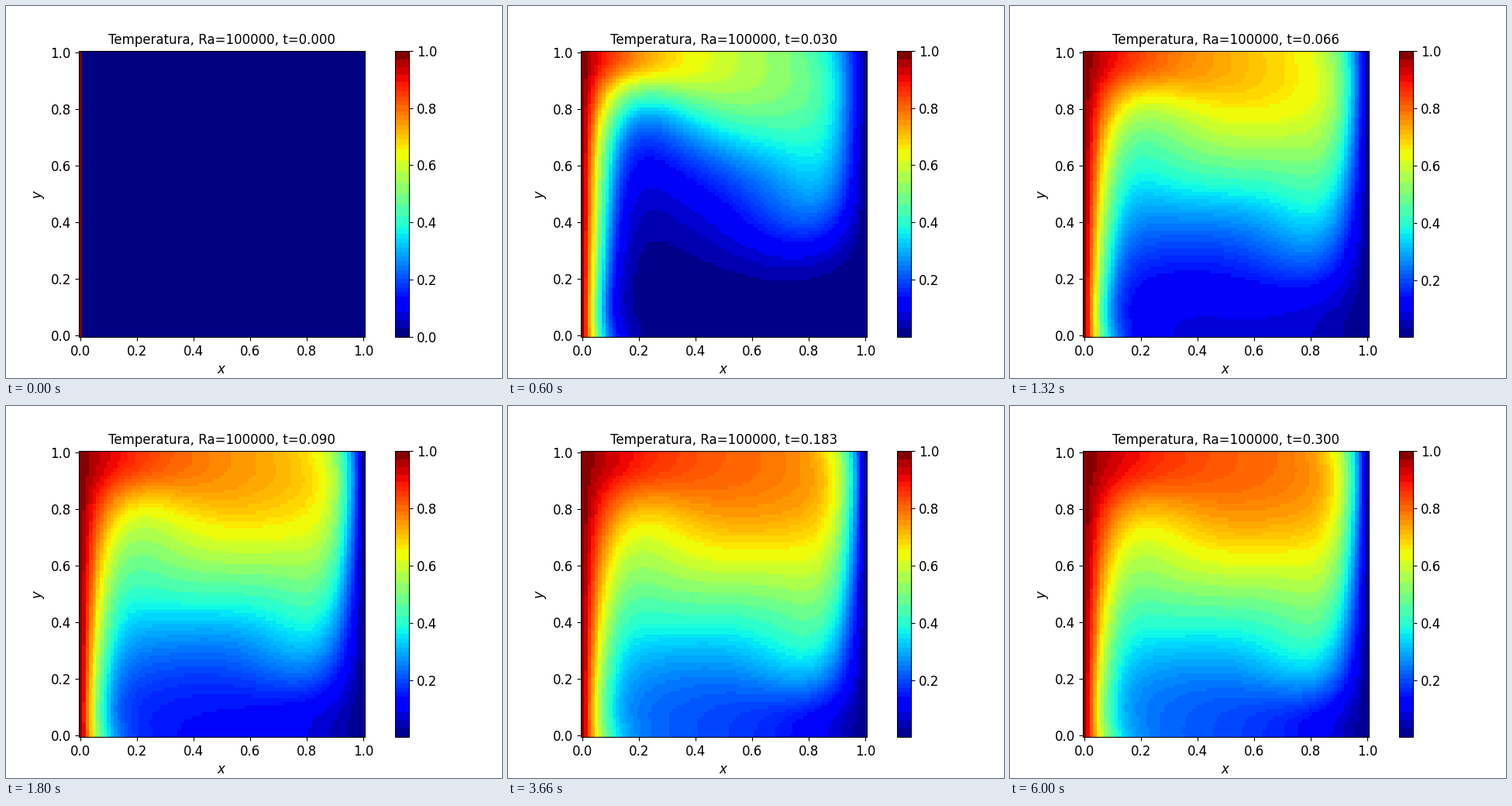
Animation, 640 px wide and 480 px high, one loop 6.06 s. Source, as a matplotlib script:

```python
import numpy as np
import matplotlib.pyplot as plt
from matplotlib.animation import FuncAnimation
from matplotlib.colors import ListedColormap

RA, PR = 100000, 0.71
N = 80                 # grid intervals per side
H = 1 / N
COLD_GAP = 0.4         # cold wall lies this many cells beyond the last column
FRAMES = 101
FRAME_DT = 0.003       # model time per frame
STEPS = 100            # solver steps per frame
DT = FRAME_DT / STEPS

# Sine transform used by the Poisson solver
k = np.arange(1, N)
SINE = np.sqrt(2 / N) * np.sin(np.pi * np.outer(k, k) / N)
lam = (2 - 2 * np.cos(np.pi * k / N)) / H**2
INV_LAM = 1 / (lam[:, None] + lam[None, :])


def ddx(a):
    return (a[1:-1, 2:] - a[1:-1, :-2]) / (2 * H)


def ddy(a):
    return (a[2:, 1:-1] - a[:-2, 1:-1]) / (2 * H)


def laplace(a):
    return (a[1:-1, 2:] + a[1:-1, :-2] + a[2:, 1:-1] + a[:-2, 1:-1]
            - 4 * a[1:-1, 1:-1]) / H**2


def simulate():
    """Natural convection in a square cavity, hot on the left, cold on the right."""
    temp = np.zeros((N + 3, N + 2))      # ghost rows at both ends, ghost column at right
    temp[:, 0] = 1
    vort = np.zeros((N + 1, N + 1))
    psi = np.zeros_like(vort)
    adv_t = np.zeros((N + 1, N))
    old_t = old_w = None
    fields = [temp[1:-1, :-1].copy()]

    for _ in range(FRAMES - 1):
        for _ in range(STEPS):
            psi[1:-1, 1:-1] = SINE @ (SINE @ vort[1:-1, 1:-1] @ SINE * INV_LAM) @ SINE
            u, v = ddy(psi), -ddx(psi)

            # no-slip walls
            vort[0], vort[-1] = -2 * psi[1] / H**2, -2 * psi[-2] / H**2
            vort[:, 0], vort[:, -1] = -2 * psi[:, 1] / H**2, -2 * psi[:, -2] / H**2

            # insulated floor and ceiling, cold right wall
            temp[0], temp[-1] = temp[2], temp[-3]
            temp[:, -1] = (1 - 1 / COLD_GAP) * temp[:, -2]

            tx, ty = ddx(temp), ddy(temp)
            adv_t[1:-1, :-1] = u * tx[1:-1, :-1] + v * ty[1:-1, :-1]
            adv_w = u * ddx(vort) + v * ddy(vort)
            if old_t is None:
                old_t, old_w = adv_t.copy(), adv_w

            dw = PR * laplace(vort) + RA * PR * tx[1:-1, :-1] - 1.5 * adv_w + 0.5 * old_w
            dt = laplace(temp) - 1.5 * adv_t + 0.5 * old_t
            vort[1:-1, 1:-1] += DT * dw
            temp[1:-1, 1:-1] += DT * dt
            old_t, old_w = adv_t.copy(), adv_w
        fields.append(temp[1:-1, :-1].copy())
    return fields


JET = np.rint(plt.get_cmap("jet")(np.arange(256))[:, :3] * 255).astype(int)
BANDS = np.unique((JET[:, 0] >> 5) * 256 + (JET[:, 1] >> 4) * 8 + (JET[:, 2] >> 5),
                  return_inverse=True)[1].ravel()


def banded_jet(field, lo, hi):
    """Jet merged into coarse bands, each the mean of the shades in use."""
    index = np.clip((field - lo) / (hi - lo) * 256, 0, 255).astype(int)
    weight = 21 * np.bincount(index.ravel(), minlength=256) + 26
    total = np.bincount(BANDS, weight)
    mean = [np.bincount(BANDS, weight * JET[:, c]) / total for c in range(3)]
    return ListedColormap(np.stack(mean, axis=1)[BANDS] / 255)


fields = simulate()

plt.rcParams.update({"font.family": "DejaVu Sans", "font.size": 12,
                     "axes.titlesize": 12})
fig, ax = plt.subplots(figsize=(6.4, 4.8), dpi=100)
nodes = np.linspace(0, 1, N + 1)
mesh = ax.pcolormesh(nodes, nodes, fields[0], shading="nearest", vmin=0, vmax=1,
                     cmap=banded_jet(fields[0], 0, 1))
ax.set_aspect("equal")
fig.colorbar(mesh, panchor=False)
ax.set_xlabel("$x$")
ax.set_ylabel("$y$")
title = ax.set_title("")


def draw(i):
    field = fields[i]
    lo, hi = max(field.min(), 0), field.max()
    mesh.set_array(field)
    mesh.set_clim(lo, hi)
    mesh.set_cmap(banded_jet(field, lo, hi))
    title.set_text(f"Temperatura, Ra={RA}, t={i * FRAME_DT:.3f}")
    return mesh, title


anim = FuncAnimation(fig, draw, frames=FRAMES, init_func=lambda: draw(0),
                     interval=60, repeat=True, repeat_delay=0)
plt.show()
```
